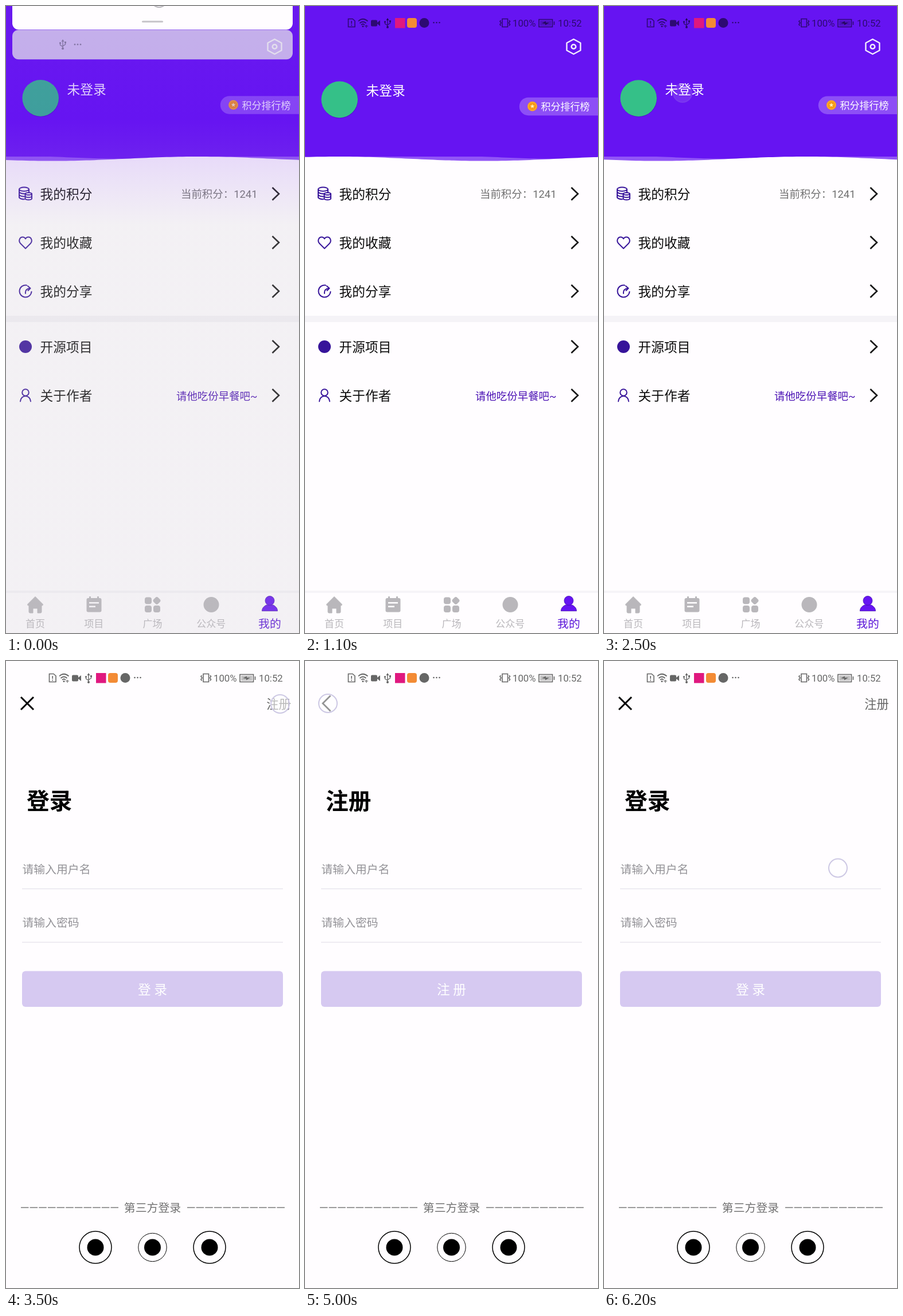
Animation of 511 by 1095 pixels, one loop 6300 ms. Source, as an HTML page:

```html
<!DOCTYPE html>
<html lang="zh-CN">
<head>
<meta charset="utf-8">
<title>个人中心与登录</title>
<style>
html, body { margin: 0; width: 100%; height: 100%; overflow: hidden; background: #fffdff; }
svg { display: block; width: 511px; height: 1095px; font-family: Roboto, "Noto Sans CJK SC", "Noto Sans CJK", sans-serif; }
.line { fill: none; stroke: #37149a; stroke-width: 2; stroke-linecap: round; stroke-linejoin: round; }
.solid { fill: #fffdff; }
</style>
</head>
<body>
<svg id="stage" viewBox="0 0 511 1095"></svg>
<script>
const LOOP = 6300, W = 511;
const PURPLE = '#6614f2', PAPER = '#fffdff', GREY = '#b9b7bb';
const sp = n => n * 3 * W / 1080;

// Text placed by the vertical centre of its glyphs
const text = (x, cy, size, fill, str, extra = '') =>
  `<text x="${x}" y="${cy + size * 0.38}" font-size="${size}" fill="${fill}" ${extra}>${str}</text>`;
const middle = 'text-anchor="middle"', end = 'text-anchor="end"';
const rect = (x, y, w, h, fill, rx = 0, extra = '') =>
  `<rect x="${x}" y="${y}" width="${w}" height="${h}" rx="${rx}" fill="${fill}" ${extra}/>`;
const disc = (x, y, r, fill, extra = '') => `<circle cx="${x}" cy="${y}" r="${r}" fill="${fill}" ${extra}/>`;
const ring = (x, y, r, stroke, width) =>
  `<circle cx="${x}" cy="${y}" r="${r}" fill="none" stroke="${stroke}" stroke-width="${width}"/>`;
const stroke = (d, color, width) =>
  `<path d="${d}" fill="none" stroke="${color}" stroke-width="${width}"/>`;
const at = (x, y, body) => `<g transform="translate(${x} ${y})">${body}</g>`;
const dots = (x, y) => [0, 5, 10].map(d => disc(x + d, y, 1.3, 'currentColor')).join('');

const usb = stroke('M0 -8V7M-4.5 -2V1L0 4M4.5 -3V0L0 3', 'currentColor', 1.4) +
  `<path d="M-2.5 -5L0 -9L2.5 -5Z" fill="currentColor"/>` + disc(0, 7, 2, 'currentColor') +
  disc(-4.5, -2.5, 1.6, 'currentColor') + rect(3, -5, 3, 3, 'currentColor');

const statusBar =
  stroke('M75.5 22.5H83L87 26V36.5H75.5Z M81.2 26V31M81.2 32.5V34.5', 'currentColor', 1.6) +
  stroke('M93 26.5Q101 19 109.5 26.5M95.5 30Q101 25 106.5 30M98 33Q101 30 104 33', 'currentColor', 1.7) +
  disc(101, 35.5, 1.5, 'currentColor') + stroke('M104 35H110M107 33V38', 'currentColor', 1.2) +
  rect(115, 24.5, 11, 11, 'currentColor', 2) +
  `<path d="M126 29L131 25V35L126 31Z" fill="currentColor"/>` +
  at(144, 30, usb) +
  rect(157, 21, 17.5, 17.5, '#e0187f') + rect(178, 21, 17, 17, '#f38b35', 4) +
  disc(208, 29.5, 8.5, 'currentColor') + dots(224.5, 29) +
  stroke('M344 22.5H353.5V36.5H344ZM341.5 25L340 27L342 29.5L340 32L341.5 34.5M356 25L357.5 27L355.5 29.5L357.5 32L356 34.5', 'currentColor', 1.6) +
  text(362, 30, 16.8, 'currentColor', '100%') +
  stroke('M408 23.5H431.5V36.5H408ZM434.5 27V33', 'currentColor', 1.6) +
  rect(410, 25.5, 19.5, 9, 'currentColor', 0, 'opacity=".4"') +
  `<path d="M413 30L420 26.5V29H426L419 33.5V31Z" fill="currentColor"/>` +
  text(441, 30, 16.8, 'currentColor', '10:52');

const icons = {
  coins: `<path class="line" d="M-11 -8A8 3.2 0 0 1 6 -8A8 3.2 0 0 1 -11 -8V6.5Q-8.5 9.5 -2 9.5M6 -8V-2M-11 -3Q-8 0 -1 0M-11 2Q-8 4.8 -2 4.8"/>
    <path class="line solid" d="M-.5 0A5.8 2.4 0 0 1 11 0V8.5A5.8 2.4 0 0 1 -.5 8.5Z"/>
    <path class="line" d="M-.5 0A5.8 2.4 0 0 0 11 0M-.5 4.2A5.8 2.4 0 0 0 11 4.2"/>`,
  heart: `<path class="line" d="M0 10.5L-9 1.5C-13 -3.5 -9.5 -9.5 -5 -9.5C-2.5 -9.5 -.8 -8 0 -6.5C.8 -8 2.5 -9.5 5 -9.5C9.5 -9.5 13 -3.5 9 1.5Z"/>`,
  share: `<path class="line" d="M2 -10.3A10.5 10.5 0 1 0 10.5 1M0 4Q-1 -4 8 -5M4 -9L8.5 -5L4.5 -1"/>`,
  repo: disc(0, 0, 11, '#37149a'),
  user: `<path class="line" d="M-9 10.5C-8 -2 8 -2 9 10.5"/><circle class="line" cx="0" cy="-5" r="5.8"/>`
};

const row = (y, icon, label, note = '') =>
  at(34, y, icons[icon]) + text(59.6, y, sp(16), '#0b0b0b', label) + note +
  stroke(`M464.5 ${y - 11}L476 ${y}L464.5 ${y + 11}`, '#151515', 2.6);
const note = (y, color, str) => text(438.6, y, sp(13), color, str, end);

const star = Array.from({length: 10}, (_, i) => {
  const r = i % 2 ? 1.7 : 4, a = i * Math.PI / 5;
  return `${r * Math.sin(a)},${-r * Math.cos(a)}`;
}).join(' ');

const header =
  disc(60.6, 162.8, 31.8, '#2a0b80', 'opacity=".35"') + disc(60.2, 161.9, 31.8, '#35c088') +
  text(106.6, 146.4, sp(16), '#fff', '未登录') +
  `<path d="M511 158.3H389.5A15.7 15.7 0 0 0 389.5 189.7H511Z" fill="#fff" opacity=".25"/>` +
  disc(396.5, 173.7, 8.5, '#f79b16') + ring(396.5, 173.7, 7.2, '#ffb743', 1) +
  at(396.5, 173.7, `<polygon points="${star}" fill="#fff0b8"/>`) +
  text(411.5, 174.5, sp(12), '#fff', '积分排行榜');

const tabs =
  rect(0, 1021, W, 4, '#f6f4f8') +
  `<path d="M51 1031.5L64 1044.5Q65.5 1047 62 1047V1058Q62 1060 60 1060H55V1052H47V1060H42Q40 1060 40 1058V1047Q36.5 1047 38 1044.5Z"
    fill="${GREY}" stroke="${GREY}" stroke-linejoin="round"/>` +
  rect(140.5, 1034, 26, 24.5, GREY, 3) + rect(145, 1031, 3, 6, GREY, 1) + rect(159, 1031, 3, 6, GREY, 1) +
  rect(145, 1041, 17, 2.6, PAPER) + rect(145, 1047.5, 11, 2.6, PAPER) +
  rect(242, 1032.5, 12, 12, GREY, 4) + rect(242, 1047, 12, 12, GREY, 4) + rect(257, 1047, 12, 12, GREY, 4) +
  rect(257.5, 1033, 11, 11, GREY, 3.5, 'transform="rotate(45 263 1038.5)"') +
  disc(358, 1045.5, 13.5, GREY) +
  `<g fill="${PURPLE}" stroke="#4410b0" stroke-width=".8">
    <path d="M446.4 1056.6Q446.4 1050 454 1046H466Q473.6 1050 473.6 1056.6Z"/><circle cx="460" cy="1038.5" r="8"/></g>` +
  ['首页', '项目', '广场', '公众号']
    .map((s, i) => text(W * (i + 0.5) / 5, 1079, sp(12), GREY, s, middle)).join('') +
  text(W * 0.9, 1078, sp(14), '#5b16d8', '我的', middle);

const profile =
  rect(0, 0, W, 276, PURPLE) +
  `<path id="back" fill="#fff" opacity=".28"/><path id="front" fill="${PAPER}"/>` +
  `<polygon points="468.5,58 480.5,64.5 480.5,77.5 468.5,84 456.5,77.5 456.5,64.5" fill="none" stroke="#f1ebfd" stroke-width="2.4" stroke-linejoin="round"/>` +
  ring(468.5, 71, 3.8, '#f1ebfd', 2.6) +
  `<g id="bob">${header}</g>` +
  row(328, 'coins', '我的积分', note(328, '#707070', '当前积分：1241')) +
  row(413, 'heart', '我的收藏') + row(498, 'share', '我的分享') +
  rect(0, 541, W, 11, '#f5f3f7') +
  row(595, 'repo', '开源项目') +
  row(680, 'user', '关于作者', note(681, '#4b12b4', '请他吃份早餐吧~')) + tabs;

const form = (id, word) => `<g id="${id}">` +
  text(36, 244, sp(28), '#000', word, 'font-weight="700"') +
  text(28.4, 363, sp(14), '#939297', '请输入用户名') + rect(28, 397, 455, 1.5, '#e9e6ee') +
  text(28.4, 456, sp(14), '#939297', '请输入密码') + rect(28, 490.5, 455, 1.5, '#e9e6ee') +
  rect(28, 541.5, 455, 62.5, '#d6c9f1', 6) +
  text(255.5, 573, sp(16), '#fff', [...word].join(' '), middle) + '</g>';

const dashes = x =>
  `<path d="M${x} 954.5h170" stroke="#777" stroke-width="1.5" stroke-dasharray="13.5 2.15"/>`;
const account =
  rect(0, 0, W, 1095, PAPER) + form('login', '登录') + form('register', '注册') +
  `<g id="close">${stroke('M26 63L48 85M48 63L26 85', '#000', 3)}${text(454.3, 75, sp(15), '#666', '注册')}</g>` +
  `<g id="return">${stroke('M44.5 60.5L31 74L44.5 87.5', '#111', 2.8)}</g>` +
  dashes(26) + dashes(316) + text(255.5, 954.5, sp(14), '#727272', '第三方登录', middle) +
  ring(156, 1024, 28, '#000', 1.5) + ring(255.5, 1024, 24.7, '#000', 1) + ring(355, 1024, 28, '#000', 1.5) +
  [156, 255.5, 355].map(x => disc(x, 1024, 14.5, '#000')).join('');

const shade =
  rect(11, 42.5, 489, 51.5, '#e8e9e9', 11, 'fill-opacity=".72"') +
  rect(11, -60, 489, 102, PAPER, 11) + rect(237, 26.5, 37, 3, '#c6c4c9', 1.5) +
  ring(267, -11, 14, '#b9b7bd', 2) + disc(454, -1, 1.5, '#999') +
  `<g color="#8577a6">${at(99, 68, usb)}${dots(120, 68)}</g>`;

document.getElementById('stage').innerHTML =
  `<defs><linearGradient id="haze" x1="0" y1="0" x2="0" y2="1">
    <stop offset="0" stop-color="#7330e4"/><stop offset=".18" stop-color="#6614f0"/>
    <stop offset=".245" stop-color="#8c55e0"/><stop offset=".35" stop-color="#c3bfc8"/>
    <stop offset="1" stop-color="#c3bfc8"/></linearGradient></defs>
  <g id="profile">${profile}</g><g id="account">${account}</g><g id="status">${statusBar}</g>
  <g id="veil">${rect(0, 0, W, 1095, 'url(#haze)')}</g><g id="shade">${shade}</g>
  <g id="touch"><circle r="16" fill="#fff" fill-opacity=".55" stroke="#cdc8e4" stroke-width="2"/></g>`;

const el = id => document.getElementById(id);
const show = (id, on) => el(id).setAttribute('display', on ? 'inline' : 'none');
const move = (id, x, y) => el(id).setAttribute('transform', `translate(${x} ${y})`);
const easeOut = u => 1 - (1 - Math.min(1, Math.max(0, u))) ** 3;

// start, end, x, y, opacity
const touches = [
  [2450, 2600, 137, 152, .2], [3450, 3720, 478, 75, 1],
  [4950, 5220, 40, 74, 1], [6150, 6300, 408, 361.5, 1]
];

function drawWaves(t) {
  const k = 2 * Math.PI / W, phase = -k * (80 + 0.2104 * t);
  let front = '', back = '';
  for (let x = 0; x <= W; x += 7) {
    const a = k * x + phase;
    front += `L${x} ${266.8 + 3.8 * Math.cos(a)}`;
    back += `L${x} ${263 + Math.max(0, 3.8 * Math.sin(a))}`;
  }
  el('front').setAttribute('d', `M0 290${front}V290Z`);
  el('back').setAttribute('d', `M0 276${back}V276Z`);
  move('bob', 0, -1.9 * Math.cos(phase));
}

function draw(t) {
  const home = t < 2600;
  show('profile', home);
  show('account', !home);
  el('status').setAttribute('color', home ? 'rgba(15,5,45,.65)' : '#666');
  if (home) {
    drawWaves(t);
  } else {
    const registering = t >= 3750 && t < 5250;
    const page = easeOut((t - 3750) / 490) - easeOut((t - 5250) / 490);
    move('login', -W * page, 0);
    move('register', W * (1 - page), 0);
    show('close', !registering);
    show('return', registering);
  }

  const closing = easeOut(t / 380);
  show('shade', closing < 1);
  move('shade', 0, -110 * closing);
  el('veil').setAttribute('opacity', 0.2 * (1 - closing));

  const touch = touches.find(([from, to]) => t >= from && t < to);
  show('touch', touch);
  if (touch) {
    move('touch', touch[2], touch[3]);
    el('touch').setAttribute('opacity', touch[4]);
  }
}

const began = performance.now();
function tick() {
  draw((performance.now() - began) % LOOP);
  requestAnimationFrame(tick);
}
tick();
</script>
</body>
</html>
```
